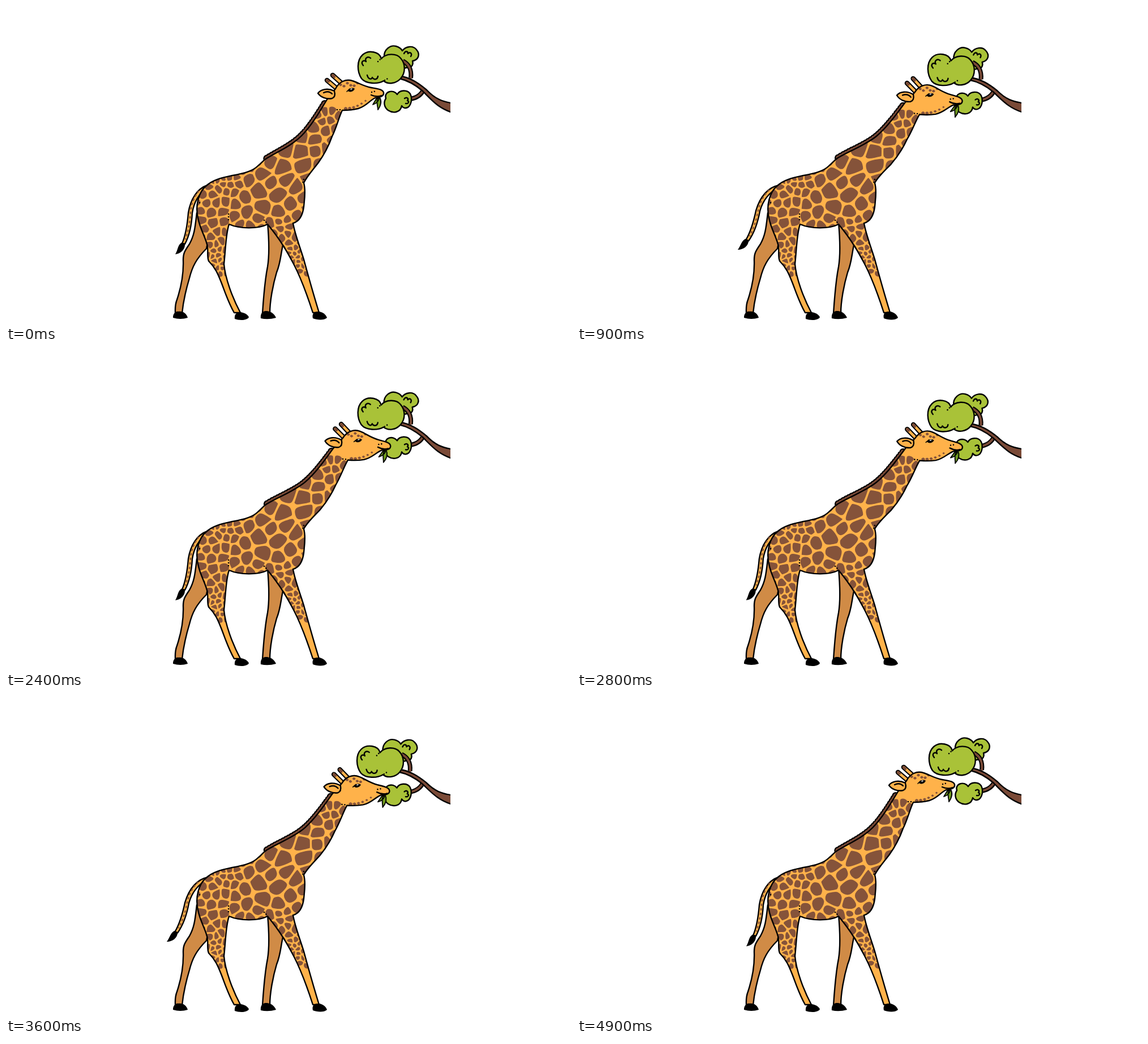
Write an HTML page that moves like this. It is 998 by 561 pixels and loops after 5000 ms.

```html
<!DOCTYPE html>
<html lang="en">
<head>
<meta charset="utf-8">
<title>Giraffe</title>
<style>
html, body { margin: 0; height: 100%; overflow: hidden; background: #fff; }
svg { display: block; width: 100vw; height: 100vh; }
path { stroke-linejoin: round; stroke-linecap: round; }
.ink { stroke: #000; stroke-width: 2.4; }
.line { fill: none; stroke: #000; stroke-width: 2.4; }
.skin { fill: #ffb24a; }
.far { fill: #d08b46; }
.leaf { fill: #a9c238; }
.bark { fill: #7a4a37; }
.spot { fill: #85533a; }
.dots { fill: none; stroke: #000; stroke-width: 2.6; stroke-dasharray: 0 5; }
.twig { fill: none; stroke: #000; stroke-width: 8; stroke-linecap: butt; }
.twig + .twig { stroke: #7a4a37; stroke-width: 3.8; }
.mane { fill: none; stroke: #000; stroke-width: 13.5; stroke-dasharray: 0 5.5; }
.mane + .mane { stroke: #7a4a37; stroke-width: 9; }
.horn { fill: none; stroke: #000; stroke-width: 8.6; }
.horn + .horn { stroke: #ffb24a; stroke-width: 4.4; }
.horn + .tip { stroke: #7a4a37; }
</style>
</head>
<body>
<svg viewBox="0 0 998 561">
  <defs>
    <clipPath id="hide"><path class="hide"/></clipPath>
    <clipPath id="edge"><path d="M500,0H785V300H500Z"/></clipPath>
  </defs>

  <g clip-path="url(#edge)"><g id="branch">
    <path class="leaf ink" d="M668,90C667,77 679,68 689,71C696,73 699,77 700,79C706,71 719,69 725,77C732,85 729,95 718,97C720,103 717,108 712,108L690,112Z"/>
    <path class="line" d="M703,84C705,79 710,79 710,84C714,80 718,84 715,89"/>
    <g>
      <path class="twig" d="M715,127C717,112 711,102 701,97"/>
      <path class="twig" d="M715,128C717,112 711,102 701,97"/>
    </g>
    <g>
      <path class="twig" d="M738,147C733,158 724,163 712,164"/>
      <path class="twig" d="M739,145C733,158 724,163 712,164"/>
    </g>
    <path class="bark ink" d="M694,123C715,126 730,137 743,148C757,163 770,169 792,172V189C765,182 752,166 736,150C722,138 708,131 695,128Z"/>
    <path class="leaf ink" d="M663,93C671,83 690,83 697,92C706,102 706,118 697,128C689,137 675,139 667,132C657,138 636,138 628,128C620,116 619,96 630,86C640,77 660,80 663,93Z"/>
    <path class="line" d="M631,105C626,99 631,94 636,98C633,92 639,88 644,92M638,122C640,130 646,130 647,126C650,131 656,130 657,124"/>
    <path class="dots" d="M657,98L661,94M669,131L674,128"/>
    <path class="leaf ink" d="M691,156C695,148 709,147 714,155C718,163 716,173 711,178C707,181 702,181 699,176C697,188 684,190 675,184C667,178 667,169 671,163C667,151 684,146 691,156Z"/>
    <path class="line" d="M704,163C708,160 712,163 709,167C713,168 711,173 706,172"/>
  </g></g>

  <path class="far ink" d="M337,365C334,390 333,404 324,420C315,433 313,437 313,448C314,474 308,500 302,518C298,528 299,534 299,542H311C313,522 318,500 324,480C329,460 336,446 354,428L362,390Z"/>
  <path class="far ink" d="M462,382C464,405 466,436 462,460C457,485 455,512 453,542H466C466,520 472,490 478,470C485,453 485,440 489,422L480,390Z"/>

  <g id="tail">
    <path class="skin ink" d="M356,316C338,322 326,340 322,365C320,390 317,405 311,419L316,420C324,405 328,385 329,365C332,345 342,330 356,320Z"/>
    <path d="M340,327C328,342 326,358 325,375C323,392 320,402 317,411" fill="none" stroke="#85533a" stroke-width="2.6" stroke-dasharray="2 6"/>
    <path d="M311,417C303,421 304,430 299,438C308,437 317,430 316,419Z"/>
  </g>

  <g id="giraffe">
    <g>
      <path class="mane" d="M461,269C480,257 505,246 522,229C538,213 552,190 566,168"/>
      <path class="mane" d="M461,269C480,257 505,246 522,229C538,213 552,190 566,168"/>
    </g>
    <path class="horn" d="M586,147L567,131M597,140L577,122"/>
    <path class="horn" d="M586,147L567,131M597,140L577,122"/>
    <path class="horn tip" d="M570,133L567,131M580,125L577,122"/>
    <path class="hide skin"/>
    <g clip-path="url(#hide)"><path id="spots" class="spot"/></g>
    <path class="hide line"/>
    <path class="skin ink" d="M551,154C556,147 568,144 580,150C582,157 581,161 576,163C566,165 556,161 551,154Z"/>
    <path class="line" d="M561,153C567,150 572,151 576,155"/>
    <path d="M604,150C606,145 612,143 616,146C614,151 608,153 604,150Z"/>
    <path class="line" style="stroke-width:1.6" d="M602,151L607,146"/>
    <path d="M609,147L611,146" stroke="#fff" stroke-width="1.5"/>
    <path class="line" d="M645,157C652,160 658,160 663,158"/>
    <path class="leaf ink" style="fill:#6f9a1f;stroke-width:1.8" d="M655,162L648,174C654,172 657,169 659,164ZM656,164C654,172 657,178 657,183C662,176 664,168 660,161Z"/>
    <path class="dots" d="M646,152L654,150M585,183L591,183M526,306L524,312M393,367L393,378M456,378L460,382M342,347L339,351"/>
  </g>

  <path d="M295,550C295,542 300,538 305,539C313,538 319,543 321,550Q308,554 295,550Z"/>
  <path d="M404,552C403,543 408,540 414,540C421,541 427,544 429,549C426,555 412,555 404,552Z"/>
  <path d="M450,551C449,543 453,538 459,538C468,538 474,543 477,550Q463,554 450,551Z"/>
  <path d="M542,551C540,543 544,539 551,539C559,539 565,544 567,550C562,555 549,554 542,551Z"/>
</svg>
<script>
const $ = s => document.querySelector(s);
const all = s => [...document.querySelectorAll(s)];

const hide = "M354,317C366,306 382,303 400,299C422,295 436,291 445,282C450,278 454,273 460,269" +
  "C480,257 505,246 522,229C538,213 552,190 567,165L582,146C588,134 600,128 612,132" +
  "C622,135 630,141 645,144C656,146 666,147 667,153C668,159 661,161 652,162" +
  "C642,167 636,177 622,181C610,184 602,184 594,184C588,196 584,214 576,230" +
  "C569,250 562,262 552,276C543,288 532,300 526,312C530,326 527,342 526,354" +
  "C524,370 518,380 507,383C510,402 519,424 526,447C535,480 545,515 553,541" +
  "L542,541C532,510 520,478 508,455C498,436 486,414 462,385C445,394 412,393 394,385" +
  "C388,402 388,430 385,455C387,480 400,515 414,541L403,541C392,522 386,502 380,487" +
  "C374,472 370,462 358,450C355,443 357,436 356,425C354,410 343,395 339,374" +
  "C334,352 340,328 354,317Z";
all(".hide").forEach(p => p.setAttribute("d", hide));

let seed = 7;
const random = () => (seed = seed * 16807 % 2147483647) / 2147483647;

// Patch size [x, y, size] at a few places, blended by distance
const sizes = [[390, 308, 10], [360, 360, 19], [415, 360, 21], [455, 330, 25], [490, 345, 27],
  [515, 285, 27], [540, 240, 20], [575, 195, 13], [370, 405, 13], [370, 440, 9], [490, 392, 14], [515, 445, 8]];
function sizeAt(x, y) {
  let sum = 0, total = 0;
  for (const [sx, sy, size] of sizes) {
    const w = 1 / (1 + Math.hypot(x - sx, y - sy) ** 3);
    sum += w * size;
    total += w;
  }
  return sum / total;
}

function scatter() {
  const sites = [];
  for (let i = 0; i < 9000; i++) {
    const x = 332 + 265 * random(), y = 186 + 286 * random(), size = sizeAt(x, y);
    if (sites.every(s => Math.hypot(s.x - x, s.y - y) > 0.42 * (s.size + size))) sites.push({ x, y, size });
  }
  return sites;
}

// Part of a polygon on the near side of a line
function cut(poly, nx, ny, limit) {
  return poly.flatMap((p, i) => {
    const q = poly[(i + 1) % poly.length];
    const a = p[0] * nx + p[1] * ny - limit, b = q[0] * nx + q[1] * ny - limit, k = a / (a - b);
    const out = a <= 0 ? [p] : [];
    if (a * b < 0) out.push([p[0] + (q[0] - p[0]) * k, p[1] + (q[1] - p[1]) * k]);
    return out;
  });
}

function patch(site, sites) {
  const { x, y, size } = site, gap = 0.9 + size * 0.035;
  let poly = Array.from({ length: 10 }, (_, i) =>
    [0.68 * size * Math.cos(i * Math.PI / 5), 0.68 * size * Math.sin(i * Math.PI / 5)]);
  for (const o of sites) {
    const dx = o.x - x, dy = o.y - y, d = Math.hypot(dx, dy);
    if (d > 0 && d < 60) poly = cut(poly, dx / d, dy / d, d * size / (size + o.size) - gap);
  }
  const at = (u, v) => `${(x + u).toFixed(1)},${(y + v).toFixed(1)}`;
  const curve = poly.map((p, i) => {
    const q = poly[(i + 1) % poly.length];
    return `${at(...p)} ${at((p[0] + q[0]) / 2, (p[1] + q[1]) / 2)}`;
  });
  return curve.length ? `M${curve.at(-1).split(" ")[1]}Q${curve.join(" ")}Z` : "";
}

const freckle = (x, y, r) => `M${x - r},${y}Q${x},${y - r * 1.6} ${x + r},${y}Q${x},${y + r * 1.6} ${x - r},${y}Z`;
let spots = "";
const sites = scatter();
for (const s of sites) spots += patch(s, sites);
for (let i = 0; i < 6; i++) {
  spots += freckle(591 + i * 6, 139 + 3 * Math.sin(i * 2.2), 3);
  spots += freckle(600 + i * 7, 181 - i * i * 0.55, 3.6 - i * 0.3);
}
$("#spots").setAttribute("d", spots);

const soft = [...all("#giraffe path"), $("#hide path")].map(el => [el, el.getAttribute("d")]);
const rad = Math.PI / 180;

// Turns points about the chest, fading out from neck to body
function bend(d, deg) {
  return d.replace(/(-?[\d.]+),(-?[\d.]+)/g, (_, x, y) => {
    const dx = x - 520, dy = y - 307;
    const u = Math.min(1, Math.max(0, ((x - 510) * 0.5 - (y - 300) * 0.85 + 15) / 60));
    const a = deg * rad * u * u * (3 - 2 * u), c = Math.cos(a), s = Math.sin(a);
    return `${(520 + dx * c - dy * s).toFixed(2)},${(307 + dx * s + dy * c).toFixed(2)}`;
  });
}

// Eased value between [time, value] keys
function ease(t, keys) {
  const i = keys.findIndex(k => k[0] > t);
  if (i < 0) return keys.at(-1)[1];
  if (i === 0) return keys[0][1];
  const [t0, a] = keys[i - 1], [t1, b] = keys[i];
  return a + (b - a) * (1 - Math.cos(Math.PI * (t - t0) / (t1 - t0))) / 2;
}
const neck = [[0, 0], [1000, 5.4], [2300, 4.7], [3100, 5.7], [4300, 1.1], [4900, 0]];
const tail = [[0, 0], [1050, 7.8], [2250, 0], [2700, 0], [3750, 7.8], [4900, 0]];
const branch = [[300, 0], [1250, 2.4], [2230, 0], [3150, 2.7], [4150, 0]];

let last = -1;
function draw(now) {
  const t = Math.floor(now % 5000 / 100) * 100;
  if (t !== last) {
    last = t;
    const deg = ease(t, neck);
    soft.forEach(([el, d]) => el.setAttribute("d", bend(d, deg)));
    $("#tail").setAttribute("transform", `rotate(${ease(t, tail)} 354 318)`);
    $("#branch").setAttribute("transform", `rotate(${-ease(t, branch)} 785 178)`);
  }
  requestAnimationFrame(() => draw(performance.now()));
}
draw(0);
</script>
</body>
</html>
```
